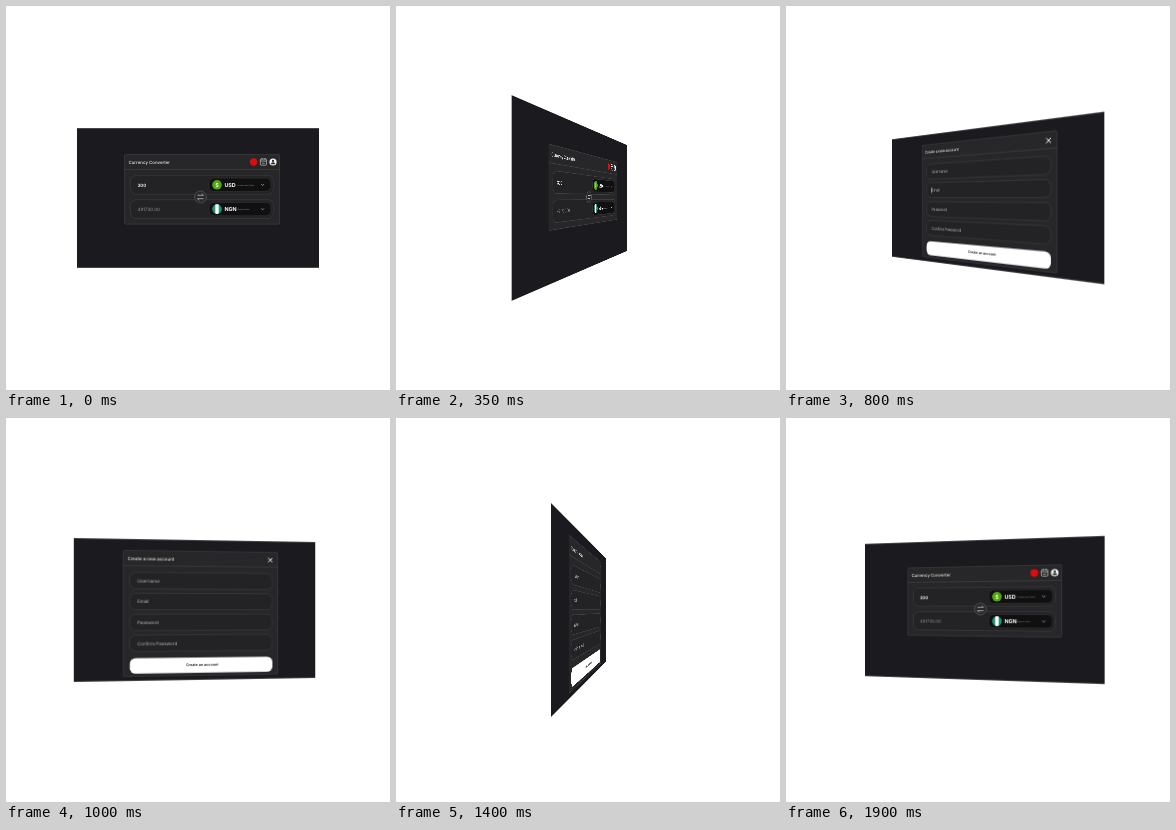
An HTML page that plays this animation: 384x384 px, repeating every 1.95 s.

```html
<!DOCTYPE html>
<html lang="en">
<head>
<meta charset="utf-8">
<title>Currency converter card flip</title>
<style>
  html, body { margin: 0; width: 100%; height: 100%; overflow: hidden; background: #fff; }
  svg { display: block; width: 384px; height: 384px; font-family: Inter, "Open Sans", sans-serif; text-rendering: geometricPrecision; }
  .panel { fill: #272729; stroke: #48484b; stroke-width: .5; }
  .field { fill: #232325; stroke: #454549; stroke-width: .5; }
  .pill { fill: #101011; stroke: #3b3b3e; stroke-width: .5; }
  .rule { stroke: #48484b; stroke-width: .5; }
  .line { fill: none; stroke: #ddd; stroke-width: .6; }
  .title { font-size: 4.4px; font-weight: 500; fill: #eee; }
  .label { font-size: 4.5px; fill: #bbb; }
  .code { font-size: 5.4px; font-weight: 700; fill: #fff; }
  .note { font-size: 1.8px; fill: #999; }
</style>
</head>
<body>
<svg id="card" viewBox="0 0 384 384">
  <rect x="71" y="122.2" width="242" height="139.6" fill="#1a1a1f"/>

  <g id="front">
    <rect class="panel" x="118.5" y="148.5" width="155" height="69.7" rx="1"/>
    <path class="rule" d="M118.5 163.5h155"/>
    <text class="title" x="122.5" y="158">Currency Converter</text>

    <circle cx="247.6" cy="156" r="3.7" fill="#e00b0b"/>
    <rect class="line" x="254.3" y="153" width="6.2" height="6.2" rx="1"/>
    <path class="line" d="M254.3 155h6.2M256 152v1.6M259 152v1.6M256 157.2h2.8"/>
    <circle cx="267" cy="156" r="3.6" fill="#f4f4f4"/>
    <circle cx="267" cy="154.9" r="1.1" fill="#222"/>
    <path d="M264.9 158.2a2.1 1.9 0 0 1 4.2 0z" fill="#222"/>

    <g id="rows"></g>

    <circle cx="194.5" cy="191" r="6" fill="#2b2b2d" stroke="#6a6a6d" stroke-width=".5"/>
    <path class="line" d="M191.5 189.3h6l-1.6-1.6M197.5 192.7h-6l1.6 1.6"/>
  </g>

  <g id="back">
    <rect class="panel" x="118.3" y="133.3" width="155.2" height="124" rx="1"/>
    <path class="rule" d="M118.3 148.3h155.2"/>
    <text class="title" x="122.5" y="143.3">Create a new account</text>
    <path d="M263.6 139l4.4 4.4m0-4.4l-4.4 4.4" stroke="#fff" stroke-width=".9"/>
    <g id="fields"></g>
    <path id="caret" d="M131.8 180.6v6" stroke="#fff" stroke-width=".7"/>
    <rect x="124.7" y="239.4" width="143.3" height="15.4" rx="5.5" fill="#fff"/>
    <text x="196.2" y="248.4" text-anchor="middle" font-size="3.7" font-weight="600" fill="#222">Create an account</text>
  </g>
</svg>

<script>
const LOOP = 1950, STEP = 50, DEPTH = 340;
const $ = id => document.getElementById(id);

const dollar = `<circle cx="211" r="4.8" fill="#4fa80c"/>
  <text x="211" y="2" text-anchor="middle" font-size="5.4" font-weight="600" fill="#fff">$</text>`;
const flag = `<circle cx="211" r="4.8" fill="#1a9770"/>
  <path d="M209.3-4.5a4.8 4.8 0 0 1 3.4 0v9a4.8 4.8 0 0 1-3.4 0z" fill="#fff"/>`;

const row = (y, amount, style, icon, code, note) => `<g transform="translate(0 ${y})">
  <rect class="field" x="124.5" y="-9.4" width="143" height="18.8" rx="6"/>
  <text class="label" x="131.5" y="1.7" style="${style}">${amount}</text>
  <rect class="pill" x="203" y="-6.7" width="62" height="13.4" rx="5"/>
  ${icon}
  <text class="code" x="218.4" y="2">${code}</text>
  <text class="note" x="231.5" y=".8">${note}</text>
  <path class="line" d="M255.2-.7l1.4 1.4 1.4-1.4"/></g>`;

$("rows").innerHTML =
  row(178.8, "300", "fill:#fff;font-weight:600", dollar, "USD", "United States Dollar") +
  row(203.1, "491730.00", "fill:#929294", flag, "NGN", "Nigerian Naira");

$("fields").innerHTML = ["Username", "Email", "Password", "Confirm Password"].map((name, i) => {
  const y = 163 + 20.6 * i;
  return `<rect class="field" x="124.7" y="${y - 8.1}" width="143.3" height="16.2" rx="6"/>
    <text class="label" x="132" y="${y + 1.7}">${name}</text>`;
}).join("");

function draw(now) {
  const time = Math.floor(now % LOOP / STEP) * STEP;
  const angle = 360 * time / LOOP;
  const flipped = angle > 90 && angle < 270;
  $("front").style.display = flipped ? "none" : "";
  $("back").style.display = flipped ? "" : "none";
  $("caret").style.display = angle < 180 ? "" : "none";
  $("card").style.transform = `perspective(${DEPTH}px) rotateY(${flipped ? angle - 180 : angle}deg)`;
  requestAnimationFrame(draw);
}
draw(performance.now());
</script>
</body>
</html>
```
